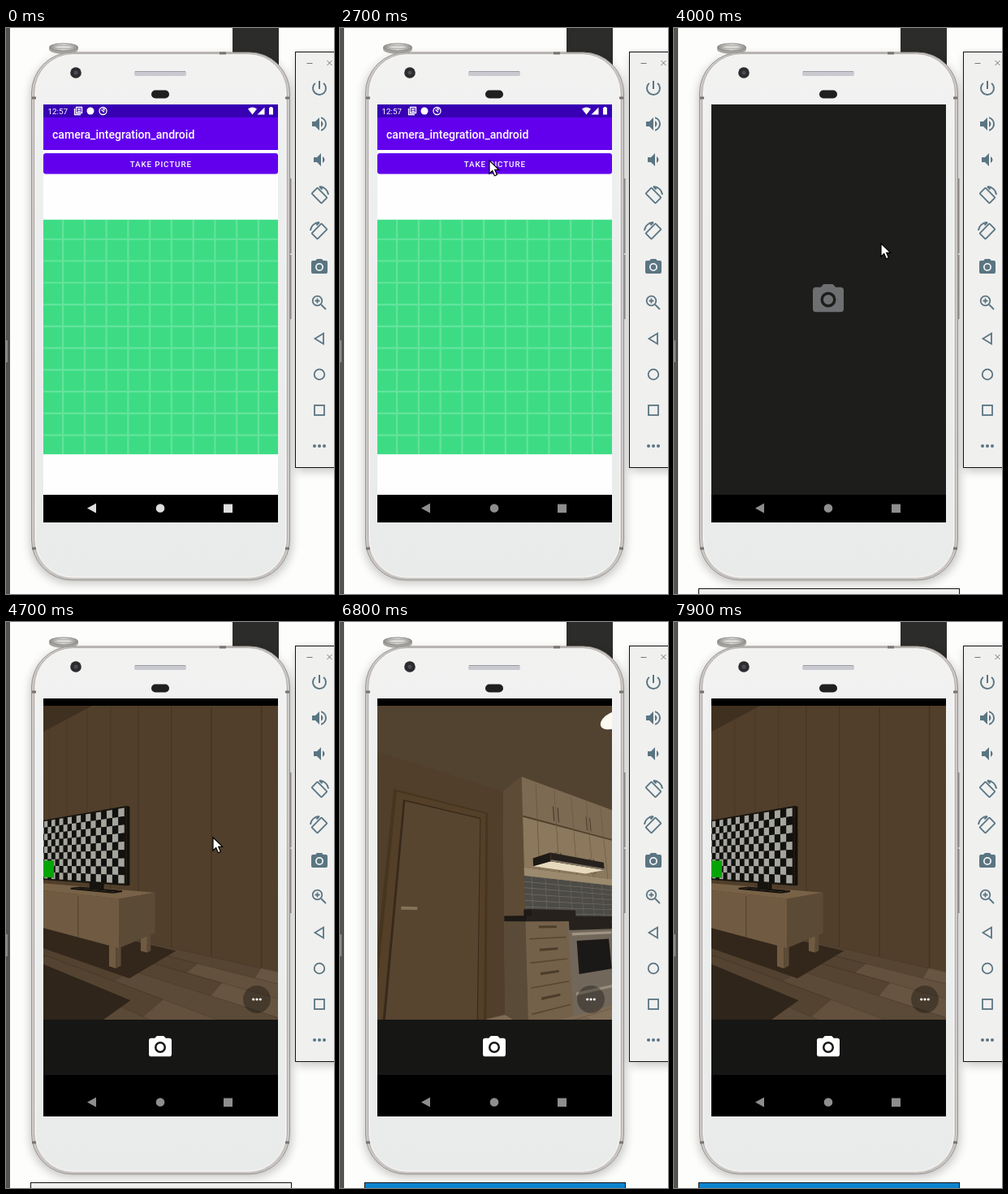
Write an HTML page with a canvas that moves like this. It is 404x696 px and loops after 8000 ms.

```html
<!DOCTYPE html>
<html lang="en">
<head>
<meta charset="utf-8">
<style>
html, body { margin: 0; width: 100%; height: 100%; overflow: hidden; background: #fdfdfc; }
svg, canvas { position: absolute; left: 0; top: 0; }
#room { left: 46px; top: 103px; }
text { font-family: Roboto, sans-serif; fill: #fff; }
</style>
</head>
<body>
<svg width="404" height="696">
  <defs>
    <filter id="blur" x="-20%" y="-20%" width="140%" height="140%"><feGaussianBlur stdDeviation="6"/></filter>
    <linearGradient id="metal"><stop stop-color="#8d8a87"/><stop offset=".5" stop-color="#efefed"/><stop offset="1" stop-color="#8d8a87"/></linearGradient>
    <linearGradient id="body" x2="0" y2="1"><stop stop-color="#f2f2f1"/><stop offset=".3" stop-color="#ecefee"/><stop offset="1" stop-color="#e9ebea"/></linearGradient>
    <path id="cam" fill-rule="evenodd" d="M9 2 7.17 4H4a2 2 0 0 0-2 2v12a2 2 0 0 0 2 2h16a2 2 0 0 0 2-2V6a2 2 0 0 0-2-2h-3.17L15 2zM12 7a5 5 0 1 1 0 10 5 5 0 0 1 0-10zM12 8.8a3.2 3.2 0 1 0 0 6.4 3.2 3.2 0 0 0 0-6.4z"/>
    <g id="turn"><rect x="-5" y="-8.500" width="10" height="17" rx="1" transform="rotate(-45)"/><path d="M0-11A11 11 0 0 1 11-1M0-11l3.500 3.500"/></g>
  </defs>

  <!-- desktop -->
  <rect width="5" height="696" fill="#53534f"/>
  <rect y="384" width="2" height="27" fill="#8a8a86"/>
  <rect x="279" width="57" height="60" fill="#2c2c2a"/>
  <rect x="30" y="34" width="322" height="649" rx="50" opacity=".22" filter="url(#blur)"/>
  <path d="M53 24v2a18 6 0 0 0 36 0v-2z" fill="#a5a3a0"/>
  <ellipse cx="71" cy="23.500" rx="17.500" ry="4.500" fill="url(#metal)" stroke="#8b8986"/>
  <ellipse cx="71" cy="23.500" rx="11" ry="2.300" fill="#d9d8d4" stroke="#a6a4a0"/>

  <!-- phone -->
  <path d="M350.500 185v92M350.500 279v79" stroke="#8f8c89" stroke-width="2"/>
  <rect x="31.500" y="30" width="318" height="649" rx="50" fill="#cfcbc9" stroke="#98948f"/>
  <rect x="34.500" y="31.500" width="312" height="646" rx="48" fill="#dedbd9" stroke="#b5b1ae"/>
  <rect x="36.500" y="33" width="308" height="642" rx="46" fill="url(#body)" stroke="#f7f7f6"/>
  <path d="M32 86h5M344 86h5M32 640h5M344 640h5M263 31h8" stroke="#77736f" stroke-width="3"/>
  <circle cx="86" cy="55" r="6.800" fill="#2c2b2d"/><circle cx="86" cy="55" r="2.500" fill="#4c4c55"/>
  <rect x="158" y="53" width="64" height="6" rx="2" fill="#c9c9d0"/><path d="M159 53.500h62" stroke="#9b9ba5"/>
  <rect x="179" y="76.500" width="22" height="10" rx="5" fill="#1f1f20"/>

  <!-- app -->
  <rect x="46" y="94" width="289" height="514" fill="#fefefe"/>
  <rect x="46" y="94" width="289" height="56" fill="#6200ee"/>
  <rect x="46" y="94" width="289" height="16" fill="#3700b3"/>
  <text x="51.500" y="105.700" font-size="9.840">12:57</text>
  <g fill="none" stroke="#fff" stroke-width="1.300">
    <path d="M86.500 97.500h7v7h-7zM84.500 99v7.500h7.500M88 100h4M88 102.500h4"/>
    <circle cx="119.500" cy="102" r="4.500"/><path d="M117.500 100.500l3.500 3M119 99.500h2v2"/>
  </g>
  <circle cx="104" cy="102" r="4.500" fill="#fff"/>
  <path d="M298 99.500q5.500-4 11 0l-5.500 7zM318.500 97.500v9h-9zM324 98h1.200v-1h2.600v1h1.200v8.500h-5z" fill="#fff"/>
  <text x="57" y="135.700" font-size="14.060" font-weight="500">camera_integration_android</text>
  <rect id="btn" x="46" y="154" width="289" height="25.500" rx="3"/>
  <text x="190.800" y="170.500" font-size="9.840" font-weight="500" letter-spacing=".88" text-anchor="middle">TAKE PICTURE</text>
  <g transform="translate(46 235.700) scale(2.676)">
    <rect width="108" height="107.800" fill="#3ddc84"/>
    <path id="grid" fill="none" stroke="#fff" stroke-opacity=".2" stroke-width=".8"/>
  </g>

  <!-- camera app -->
  <g id="splash">
    <rect x="46" y="94" width="289" height="480" fill="#1d1d1b"/>
    <use href="#cam" fill="#6d6f71" transform="translate(167.200 311.200) scale(1.9)"/>
  </g>
  <g id="panel">
    <rect x="46" y="94" width="289" height="480"/>
    <rect x="46" y="489" width="289" height="68" fill="#161614"/>
    <use href="#cam" fill="#fff" transform="translate(173.200 506.200) scale(1.4)"/>
  </g>
  <rect x="46" y="574" width="289" height="34"/>
  <path id="nav" d="M111 584.500v12l-11-6zM184.700 590.500a5.300 5.300 0 1 0 10.600 0 5.300 5.300 0 1 0-10.600 0zM268 585.500h11v10.500h-11z"/>
  <rect id="bar" x="30.500" y="689.500" width="321" height="20" stroke="#111"/>

  <!-- side toolbar -->
  <rect x="358" y="34" width="60" height="511" opacity=".22" filter="url(#blur)"/>
  <rect x="356.500" y="29.500" width="60" height="511" fill="#f0f0ef" stroke="#111"/>
  <path d="M370.500 43.500h7M395.500 40l6 6M401.500 40l-6 6" stroke="#777"/>
  <g fill="#5a7582">
    <path transform="translate(374 62)" d="M13 3h-2v10h2zM17.830 5.170l-1.420 1.420A6.920 6.920 0 0 1 19 12a7 7 0 1 1-11.410-5.410L6.170 5.170A9 9 0 1 0 17.830 5.170z"/>
    <path transform="translate(374 106)" d="M3 9v6h4l5 5V4L7 9zM16.500 12A4.500 4.500 0 0 0 14 7.970v8.050A4.500 4.500 0 0 0 16.500 12zM14 3.230v2.060a7 7 0 0 1 0 13.420v2.060a9 9 0 0 0 0-17.540z"/>
    <path transform="translate(374 150)" d="M18.500 12A4.500 4.500 0 0 0 16 7.970v8.050A4.500 4.500 0 0 0 18.500 12zM5 9v6h4l5 5V4L9 9z"/>
    <use href="#cam" transform="translate(374 282)"/>
    <circle cx="380" cy="514" r="2"/><circle cx="386" cy="514" r="2"/><circle cx="392" cy="514" r="2"/>
  </g>
  <g fill="none" stroke="#5a7582" stroke-width="1.800">
    <use href="#turn" x="386" y="206"/>
    <use href="#turn" transform="translate(386 250) scale(-1 1)"/>
    <circle cx="383.500" cy="335.500" r="5.800"/><path d="M388 340l6 6M380.500 335.500h6M383.500 332.500v6"/>
    <path d="M391 375.500v13l-10.500-6.500z"/><circle cx="386" cy="426" r="6.300"/><rect x="380" y="464" width="12" height="12"/>
  </g>
</svg>

<canvas id="room" width="289" height="386"></canvas>

<svg width="404" height="696">
  <g id="more" fill="#fff">
    <circle cx="309" cy="464" r="17" fill="#000" opacity=".32"/>
    <circle cx="304.700" cy="464" r="1.600"/><circle cx="309" cy="464" r="1.600"/><circle cx="313.300" cy="464" r="1.600"/>
  </g>
  <path id="cursor" d="M0 0v16l3.700-3.500 2.700 6.300 3-1.300-2.700-6.100h5z" fill="#fff" stroke="#000" stroke-width="1.200"/>
</svg>

<script>
const $ = id => document.getElementById(id);
const ctx = $('room').getContext('2d');
const RAD = Math.PI / 180, FOCAL = 300, NEAR = .05;
ctx.translate(144.5, 193);

let lines = '';
for (let i = 9; i < 100; i += 10) lines += `M${i} 0V107.8M0 ${i}H108`;
for (let i = 29; i < 80; i += 10) lines += `M${i} 19V89M19 ${i}H89`;
$('grid').setAttribute('d', lines);

// ---- room seen from its origin: u along the kitchen wall, v towards it, floor at y = -1
const BACK = 2.45, FRONT = 2.05;
const faces = [];
const face = (fill, pts, edge) =>
  faces.push({ fill, edge, pts: pts.map(([u, y, v]) => [.586 * u - .81 * v, y, .81 * u + .586 * v]) });
const wall = (fill, v, u0, u1, y0, y1) => face(fill, [[u0, y0, v], [u1, y0, v], [u1, y1, v], [u0, y1, v]]);
const side = (fill, u, v0, v1, y0, y1) => face(fill, [[u, y0, v0], [u, y0, v1], [u, y1, v1], [u, y1, v0]]);
const slab = (fill, y, u0, u1, v0, v1, edge) => face(fill, [[u0, y, v0], [u1, y, v0], [u1, y, v1], [u0, y, v1]], edge);
const rgb = (c, k = 1) => `rgb(${c.map(n => Math.min(255, n * k | 0))})`;

// only the faces turned to the viewer
function crate(c, u0, u1, v0, v1, y0, y1, under = rgb(c, .8)) {
  if (y0 > 0) slab(under, y0, u0, u1, v0, v1);
  if (y1 < 0) slab(rgb(c, 1.08), y1, u0, u1, v0, v1);
  if (u0 > 0) side(rgb(c, .78), u0, v0, v1, y0, y1);
  if (u1 < 0) side(rgb(c, .82), u1, v0, v1, y0, y1);
  wall(rgb(c), v0, u0, u1, y0, y1);
}

let seed = 7;
const rnd = () => (seed = seed * 16807 % 2147483647) / 2147483647;

function buildShell() {
  wall('#513f2b', BACK, -9, 5.5, -1, 2.4);
  side('#75634b', 5.5, -6, BACK, -1, 1.65);
  for (let u = -7; u < -.2; u += .5) wall('#443423', BACK, u, u + .012, -1, 2.4);
  slab('#403020', 2.34, -9, -1, -6, BACK);
  slab('#524230', 1.65, -1, 5.5, -6, BACK);
  for (let k = 0; k < 3; k++) {
    const disc = [];
    for (let a = 0; a < 360; a += 20)
      disc.push([1.76 + .59 * k + .1 * Math.cos(a * RAD), 1.64, .97 + .1 * Math.sin(a * RAD)]);
    face('#fffaf0', disc);
  }
  // floor boards, lighter towards the kitchen
  for (let v = BACK; v > -3.5; v -= .24)
    for (let u = -8 + rnd() * 1.4; u < 5.5; u += 1.5) {
      const t = Math.min(1, Math.max(0, (u + 2.2) / 3.5)), k = .97 + rnd() * .06;
      const c = [84 + 44 * t, 67 + 42 * t, 49 + 39 * t];
      slab(rgb(c, k), -1, u, Math.min(5.5, u + 1.5), v - .24, v, rgb(c, .85));
    }
}

function buildDoor() {
  wall('#46351f', BACK, .28, 1.38, -1, 1.29);
  wall('#543f28', BACK, .31, 1.35, -1, 1.27);
  wall('#37291a', BACK, .38, 1.28, -1, 1.2);
  wall('#574530', BACK, .4, 1.27, -1, 1.185);
  wall('#85735a', BACK, .45, .6, .09, .12);
}

function buildKitchen() {
  const WOOD = [124, 106, 82], BASE = [116, 97, 73], STEEL = [103, 94, 83], DARK = [38, 33, 29];
  const left = 1.61, right = 4.6, skin = FRONT - .005;
  wall('#75634b', BACK, left, 5.5, -1, 1.65);
  wall('#4d4b46', BACK, left, 4.2, 0, .56);
  for (let y = .07; y < .56; y += .08) wall('#77736a', BACK, left, 4.2, y, y + .007);
  for (let u = 1.8; u < 4.2; u += .24) wall('#6c685f', BACK, u, u + .01, 0, .56);
  crate([112, 94, 71], right, 5.5, 2.2, BACK, .95, 1.55);

  // wall cupboards: two rows of doors with paired handles
  crate(WOOD, left, right, FRONT, BACK, .55, 1.65, '#9b8a6d');
  wall('#8b785d', skin, left, right - .2, .55, 1.14);
  wall('#4d3d2a', skin, left, right, 1.135, 1.155);
  for (let u = 2.13; u < right; u += .62) {
    for (const s of [u, u - .31]) wall('#68563f', skin, s, s + .01, .55, 1.62);
    for (const y of [.59, 1.19])
      for (const h of [u - .04, u + .04]) wall('#44372a', skin, h, h + .015, y, y + .2);
  }
  crate(DARK, 2.08, 3.12, 2.12, BACK, .69, .8, '#e6d9bd');
  wall('#857a69', 2.115, 2.08, 3.12, .69, .71);

  // full-height end panel and worktop
  side('#5d4b36', left, FRONT, BACK, -1, 1.65);
  crate(DARK, 1.9, 2.66, 2.3, BACK, .04, .12);

  // drawers, oven, cupboard, dishwasher
  crate(BASE, left, right, FRONT, BACK, -1, 0);
  for (let y = -.2; y > -.9; y -= .23) {
    wall('#574631', skin, left + .04, 2.18, y, y + .012);
    wall('#4c3d2b', skin, 1.78, 2.04, y + .11, y + .135);
  }
  wall(rgb(STEEL, 1.1), skin, 2.22, 3.07, -1, 0);
  wall(rgb(DARK), skin, 2.24, 3.05, -.12, -.01);
  wall('#a09584', skin, 2.28, 3.02, -.18, -.15);
  wall('#1b1917', skin, 2.35, 2.95, -.6, -.24);
  wall('#988d7c', skin, 2.28, 3.02, -.81, -.78);
  wall('#574631', skin, 3.42, 3.44, -1, 0);
  wall(rgb(STEEL, .85), skin, 3.82, right, -1, 0);
  wall(rgb(DARK), skin, 3.82, right, -.12, 0);
  crate(DARK, left, right, 2.02, BACK, -.02, .04);

  // fridge
  crate(STEEL, right, 5.38, 1.95, BACK, -1, .88);
  wall(rgb(DARK), 1.945, right, 5.38, -.31, -.29);
  wall(rgb(DARK), 1.945, 4.8, 4.84, -.2, .65);
  wall(rgb(DARK), 1.945, 4.8, 4.84, -.75, -.4);
}

function buildTelevision() {
  const WOOD = [112, 91, 66], BLACK = [23, 20, 15], CELL = .092;
  slab('#33271b', -1, -4.5, -1.4, 1.6, 2.4);
  slab('#2f251b', -1, -4, -1.17, -1, 1.35);
  for (const v of [2.17, 1.68]) crate(WOOD, -1.73, -1.64, v, v + .07, -1, -.8);
  crate(WOOD, -4.5, -1.6, 1.68, 2.27, -.8, -.34);
  for (let u = -2.2; u > -4; u -= .7) wall('#54432e', 1.675, u, u + .015, -.8, -.36);
  crate(BLACK, -2.7, -1.95, 1.95, 2.1, -.34, -.32);
  crate(BLACK, -2.4, -2.2, 2, 2.05, -.32, -.24);
  crate(BLACK, -3.9, -1.79, 2, 2.05, -.25, .62);
  for (let c = 0; c < 22; c++)
    for (let r = 0; r < 9; r++) {
      const u = -1.82 - c * CELL, y = .6 - r * CELL;
      wall((c + r) % 2 ? '#11110f' : '#a5a59e', 1.995, u - CELL, u, y - CELL, y);
    }
  wall('#05a505', 1.99, -3.45, -3.13, -.21, .03);
}

buildShell();
buildDoor();
buildKitchen();
buildTelevision();

function drawRoom(yaw, pitch) {
  const ca = Math.cos(yaw * RAD), sa = Math.sin(yaw * RAD), cp = Math.cos(pitch * RAD), sp = Math.sin(pitch * RAD);
  const put = ([x, y, z]) => ctx.lineTo(x / z * FOCAL, -y / z * FOCAL);
  for (const { pts, fill, edge } of faces) {
    const local = pts.map(([x, y, z]) => {
      const depth = x * sa + z * ca;
      return [x * ca - z * sa, y * cp - depth * sp, depth * cp + y * sp];
    });
    ctx.beginPath();
    local.forEach((p, i) => {
      const q = local[(i + 1) % local.length];
      if (p[2] >= NEAR) put(p);
      if ((p[2] >= NEAR) != (q[2] >= NEAR)) {
        const k = (NEAR - p[2]) / (q[2] - p[2]);
        put(p.map((n, j) => n + (q[j] - n) * k));
      }
    });
    ctx.closePath();
    ctx.fillStyle = fill;
    ctx.fill();
    if (edge) { ctx.strokeStyle = edge; ctx.lineWidth = .8; ctx.stroke(); }
  }
}

// ---- timeline
const clamp = (t, a, b) => Math.min(1, Math.max(0, (t - a) / (b - a)));
function track(keys, t) {
  const i = keys.findIndex(k => k[0] > t);
  if (i < 0) return keys[keys.length - 1].slice(1);
  if (!i) return keys[0].slice(1);
  const a = keys[i - 1], b = keys[i], k = clamp(t, a[0], b[0]), e = k * k * (3 - 2 * k);
  return a.slice(1).map((n, j) => n + (b[j + 1] - n) * e);
}
// time, yaw, pitch
const LOOK = [[5700, -88, 0], [6200, 0, 0], [6800, -23, 13.1], [7200, -9.8, -11.3], [7700, -88, 0]];
// time, x, y
const MOUSE = [[1000, 348, 128], [1800, 318, 200], [2600, 184, 163], [3200, 184, 163], [3900, 255, 265]];

function frame(now) {
  const t = Math.floor(now % 8000 / 100) * 100;
  const show = (id, on) => $(id).style.opacity = +on;
  const paint = (id, fill) => $(id).setAttribute('fill', fill);
  paint('nav', rgb([1, 1, 1], 222 - 80 * clamp(t, 100, 900)));
  paint('btn', t >= 2900 && t < 3300 ? '#8133f1' : '#6200ee');
  paint('bar', t < 5800 ? '#f0f0ef' : '#0a84cf');
  show('bar', t >= 3800);
  show('splash', clamp(t, 3100, 3500));
  show('panel', t >= 4300);
  show('more', t >= 4400);
  show('room', clamp(t, 4300, 4700));
  show('cursor', t >= 1000 && t < 5800);
  $('cursor').setAttribute('transform', `translate(${track(MOUSE, t)})`);
  if (t >= 4300) drawRoom(...track(LOOK, t));
  requestAnimationFrame(frame);
}
requestAnimationFrame(frame);
</script>
</body>
</html>
```
